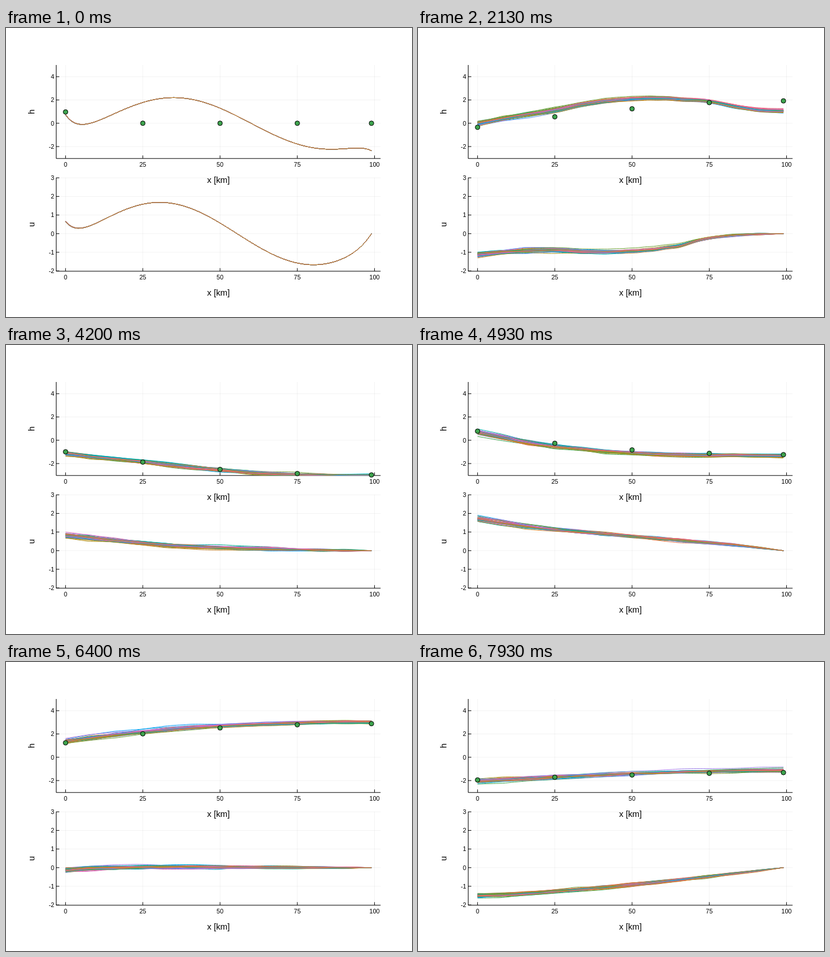
Write an HTML page that moves like this. It is 700x500 px and loops after 8000 ms.

```html
<!DOCTYPE html>
<html lang="en">
<head>
<meta charset="utf-8">
<title>Tidal wave ensemble</title>
<style>
  html, body { margin: 0; width: 100%; height: 100%; overflow: hidden; background: #fff; }
  svg { display: block; width: 700px; height: 500px; }
  text { font-family: "Liberation Sans", Arial, sans-serif; font-size: 10.67px; }
  .label { font-size: 14.67px; text-anchor: middle; }
  .grid { stroke: #000; stroke-opacity: .1; stroke-width: .5; }
  .axis { stroke: #000; stroke-width: 1; }
  .line { fill: none; stroke-width: 1; stroke-linejoin: round; }
  .gauge { fill: #3ea44e; stroke: #000; stroke-width: 1; }
</style>
</head>
<body>
<svg id="stage" viewBox="0 0 700 500"></svg>
<script>
const STEPS = 120, CELLS = 100, MEMBERS = 40;
const PALETTE = ['#009afa', '#e36f47', '#3ea44e', '#c371d2', '#ac8e18', '#00aaae', '#ed5e93', '#c68225',
  '#00a98d', '#8e971e', '#00a9cc', '#9b7fe9', '#618df6', '#f06073', '#dd65b6', '#6c9f33'];
const GAUGES = [0, 25, 50, 75, 99];

// Surge added to the regular tide: [step, height].
const MODEL_SURGE = [[0, -.12], [15, .4], [19, -.7], [30, .1], [63, -.24], [71, -.8], [78, 0], [119, .1]];
const GAUGE_SURGE = [[0, .13], [19, -.4], [45, -.1], [63, -.15], [71, -.6], [78, -.1], [108, -.1], [119, .2]];

const cells = fn => Array.from({ length: CELLS }, (_, x) => fn(x));
const near = d => Math.exp(-d / 4);
const wave = (x, shift) => Math.sin(2 * Math.PI * (x - shift) / 100);

function ease(knots, n) {
  const i = Math.max(1, knots.findIndex(([step]) => step >= n));
  const [from, a] = knots[i - 1], [to, b] = knots[i];
  const t = Math.min(1, (n - from) / (to - from));
  return a + (b - a) * t * t * (3 - 2 * t);
}

const tide = surge => n => 2.2 * Math.cos(2 * Math.PI * (n - 13.5) / 72) + ease(surge, Math.min(n, STEPS - 1));

// Damped shallow water: forced at the left, wall at the right, ten minutes per step.
function simulate(force, startH, startU) {
  const depth = 20, gravity = 9.81, drag = 1 / 5184, dx = 1000, dt = 60, sub = 10;
  const h = cells(startH), u = cells(startU), history = [];
  for (let n = 0; n < STEPS; n++) {
    history.push({ h: h.slice(), u: u.slice() });
    for (let k = 1; k <= sub; k++) {
      for (let i = 0; i < CELLS - 1; i++)
        u[i] = (u[i] - dt * gravity * (h[i + 1] - h[i]) / dx) / (1 + dt * drag);
      for (let i = 1; i < CELLS; i++) h[i] -= dt * depth * (u[i] - u[i - 1]) / dx;
      h[0] = force(n) + (force(n + 1) - force(n)) * k / sub;
    }
  }
  return history;
}

const mean = simulate(tide(MODEL_SURGE),
  x => 2.2 * wave(x, 10) + 2.02 * near(x) - .95 * near(99 - x),
  x => 1.68 * wave(x, 5.5) + 1.22 * near(x) + .667 * near(99 - x));
const truth = simulate(tide(GAUGE_SURGE), x => .97 * near(x), x => .68 * near(x));

let seed = 20;
function random() {
  seed = (Math.imul(seed, 1664525) + 1013904223) >>> 0;
  return (seed + .5) / 4294967296;
}
const normal = () => Math.sqrt(-2 * Math.log(random())) * Math.cos(2 * Math.PI * random());

function makeMember() {
  const keep = .78, spread = .115, noise = [.02 * normal()];
  for (let n = 1; n <= STEPS; n++)
    noise.push(keep * noise[n - 1] + spread * Math.sqrt(1 - keep * keep) * normal());
  return simulate(n => noise[n], x => noise[0] * near(x), x => .7 * noise[0] * near(x));
}
const members = Array.from({ length: MEMBERS }, makeMember);
const valueAt = (m, n, key, x) => mean[n][key][x] + members[m][n][key][x] * (1 - .3 * x / 99);

const stage = document.getElementById('stage');
function add(tag, attrs, parent = stage, content = '') {
  const el = document.createElementNS('http://www.w3.org/2000/svg', tag);
  for (const name in attrs) el.setAttribute(name, attrs[name]);
  el.textContent = content;
  parent.appendChild(el);
  return el;
}
const segment = (cls, x1, y1, x2, y2) => add('line', { class: cls, x1, y1, x2, y2 });

const LEFT = 86.6, RIGHT = 645.8;
const px = x => 102.7 + 5.327 * x;

function makePanel({ key, top, bottom, zero, scale, ticks }) {
  const py = v => zero - scale * v;
  const xTicks = [0, 25, 50, 75, 100];
  xTicks.forEach(x => segment('grid', px(x), top, px(x), bottom));
  ticks.forEach(v => segment('grid', LEFT, py(v), RIGHT, py(v)));
  segment('axis', LEFT, bottom, RIGHT, bottom);
  segment('axis', LEFT, top, LEFT, bottom);
  xTicks.forEach(x => {
    segment('axis', px(x), bottom, px(x), bottom - 5.3);
    add('text', { x: px(x), y: Math.round(bottom + 14), 'text-anchor': 'middle' }, stage, x);
  });
  ticks.forEach(v => {
    segment('axis', LEFT, py(v), LEFT + 5.3, py(v));
    add('text', { x: 83.2, y: Math.round(py(v) + 3.8), 'text-anchor': 'end' }, stage, v);
  });
  const middle = (top + bottom) / 2;
  add('text', { class: 'label', x: 366.3, y: Math.round(bottom + 42.2) }, stage, 'x [km]');
  add('text', { class: 'label', transform: `translate(49 ${middle}) rotate(-90)` }, stage, key);

  const clip = add('clipPath', { id: 'clip-' + key });
  add('rect', { x: LEFT, y: top, width: RIGHT - LEFT, height: bottom - top }, clip);
  const group = add('g', { 'clip-path': `url(#clip-${key})` });
  const lines = members.map((_, m) =>
    add('polyline', { class: 'line', stroke: PALETTE[m % PALETTE.length] }, group));
  const draw = n => lines.forEach((line, m) => {
    const points = cells(x => px(x).toFixed(1) + ',' + py(valueAt(m, n, key, x)).toFixed(2));
    line.setAttribute('points', points.join(' '));
  });
  return { py, draw };
}

const surface = makePanel({ key: 'h', top: 64, bottom: 225.8, zero: 164.8, scale: 20.15, ticks: [-2, 0, 2, 4] });
const dots = GAUGES.map(x => add('circle', { class: 'gauge', cx: px(x), r: 4 }));
const velocity = makePanel({ key: 'u', top: 259, bottom: 420.8, zero: 355.8, scale: 32.2, ticks: [-2, -1, 0, 1, 2, 3] });

// Three steps every 200 ms, lasting 70, 60 and 70 ms.
function stepAt(ms) {
  const t = ms % 8000, rest = t % 200;
  return Math.floor(t / 200) * 3 + (rest < 70 ? 0 : rest < 130 ? 1 : 2);
}

let shown = -1;
function show(n) {
  if (n === shown) return;
  shown = n;
  surface.draw(n);
  velocity.draw(n);
  dots.forEach((dot, i) => dot.setAttribute('cy', surface.py(truth[n].h[GAUGES[i]])));
}

const start = performance.now();
function tick() {
  show(stepAt(performance.now() - start));
  requestAnimationFrame(tick);
}
tick();
</script>
</body>
</html>
```
